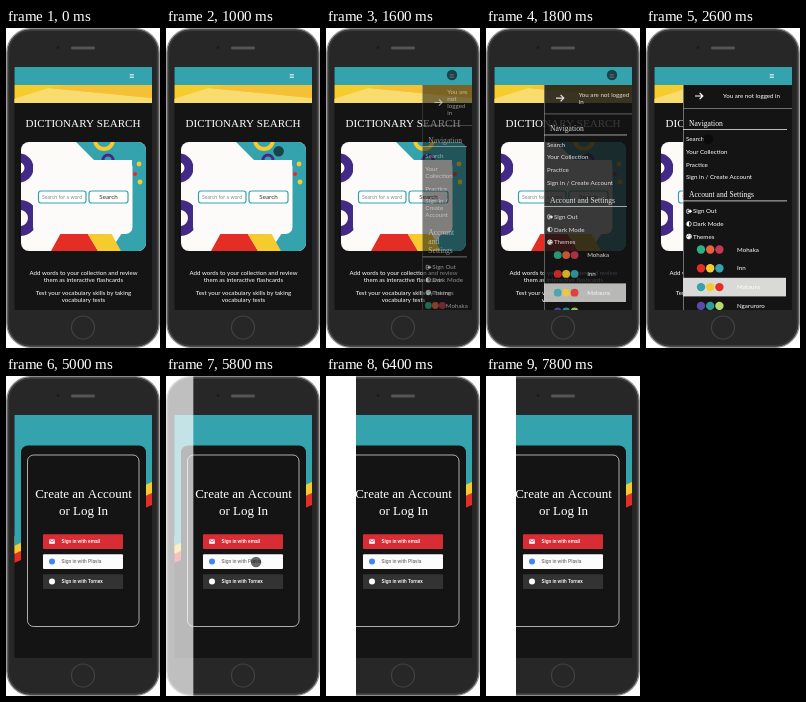
These frames come from a looping animation (154 px wide and 320 px high, 8000 ms). An HTML page with a canvas:

```html
<!DOCTYPE html>
<html lang="en">
<head>
<meta charset="utf-8">
<title>Dictionary app</title>
<style>
html, body { margin: 0; width: 100%; height: 100%; overflow: hidden; background: #fff; }
canvas { display: block; width: 154px; height: 320px; }
</style>
</head>
<body>
<canvas id="stage"></canvas>
<script>
const W = 154, H = 320, LOOP = 8000, STEP = 200;
const TEAL = '#35a3ae', YELLOW = '#f6cb2d', RED = '#e32d25', PURPLE = '#432a86',
      INK = '#141414', WHITE = '#fff';
const SANS = 'Lato, "Open Sans", sans-serif';
const SERIF = '"Liberation Serif", serif';
const SCREEN = { x: 8.5, y: 39, w: 137.5, h: 243 };
const RIGHT = SCREEN.x + SCREEN.w;

const canvas = document.getElementById('stage');
const c = canvas.getContext('2d');
const dpr = window.devicePixelRatio || 1;
canvas.width = W * dpr;
canvas.height = H * dpr;

const clamp = v => Math.max(0, Math.min(1, v));
const mix = (a, b, k) => a + (b - a) * k;
const ease = k => k * k * (3 - 2 * k);

function rect(x, y, w, h, fill) {
  c.fillStyle = fill;
  c.fillRect(x, y, w, h);
}

function round(x, y, w, h, r, fill, stroke, line = 1) {
  c.beginPath();
  c.roundRect(x, y, w, h, r);
  if (fill) { c.fillStyle = fill; c.fill(); }
  if (stroke) { c.strokeStyle = stroke; c.lineWidth = line; c.stroke(); }
}

function dot(x, y, r, fill) {
  c.beginPath();
  c.arc(x, y, r, 0, 7);
  c.fillStyle = fill;
  c.fill();
}

function ring(x, y, r, stroke, line) {
  c.beginPath();
  c.arc(x, y, r, 0, 7);
  c.strokeStyle = stroke;
  c.lineWidth = line;
  c.stroke();
}

function poly(fill, ...p) {
  c.beginPath();
  for (let i = 0; i < p.length; i += 2) c.lineTo(p[i], p[i + 1]);
  c.closePath();
  c.fillStyle = fill;
  c.fill();
}

function text(s, x, y, size, family, fill = WHITE, align = 'left', weight = 400) {
  c.font = `${weight} ${size}px ${family}`;
  c.textAlign = align;
  c.textBaseline = 'alphabetic';
  c.fillStyle = fill;
  c.fillText(s, x, y + size * 0.34);
}

function clipped(path, draw) {
  c.save();
  c.beginPath();
  path();
  c.clip();
  draw();
  c.restore();
}

// Draws word-wrapped lines and returns the y of the last one.
function wrapped(s, x, y, width, size, family, gap) {
  c.font = `400 ${size}px ${family}`;
  const lines = [];
  for (const word of s.split(' ')) {
    const last = lines[lines.length - 1];
    if (last && c.measureText(last + ' ' + word).width <= width) lines[lines.length - 1] += ' ' + word;
    else lines.push(word);
  }
  lines.forEach((l, i) => text(l, x, y + i * gap, size, family));
  return y + (lines.length - 1) * gap;
}

function phone() {
  round(0.9, 0.7, 152.2, 318.6, 24, '#272727', '#8c8c8d', 1.4);
  round(2.6, 2.2, 148.8, 315.6, 22, null, '#3a3a3b', 1.4);
  dot(52, 19.5, 1.3, '#1a1a1c');
  round(65, 18.6, 24, 2.8, 1.4, '#555');
  ring(77, 299.5, 11.5, '#434344', 1.2);
}

function banner() {
  rect(8, 57, 138, 18, YELLOW);
  poly('#f8dc70', 8, 75, 8, 71, 42, 60, 146, 70, 146, 75);
  poly('#f4c136', 42, 60, 60, 57, 146, 57, 146, 70);
}

function art() {
  clipped(() => c.roundRect(15, 114, 125, 109, 8), () => {
    rect(15, 114, 125, 109, '#fdfbf8');
    poly(TEAL, 70, 114, 140, 114, 140, 223, 104, 223, 126, 190, 126, 132, 88, 132);
    ring(98, 112, 9, YELLOW, 4);
    ring(13, 140, 10, PURPLE, 9);
    ring(14, 190, 13, PURPLE, 10);
    poly(RED, 45, 223, 56, 203, 80, 203, 92, 223);
    poly(YELLOW, 80, 203, 104, 203, 115, 223, 92, 223);
    ring(102, 132, 5, PURPLE, 3);
    dot(133, 136, 2.4, YELLOW);
    dot(129, 146, 2, RED);
    dot(134, 154, 2.4, YELLOW);
  });
  round(27, 132, 99.5, 74, 7, '#fdfbfa');
}

function searchPage() {
  rect(8, 39, 138, 243, INK);
  banner();
  text('DICTIONARY SEARCH', 77, 95, 11.1, SERIF, WHITE, 'center');
  art();
  round(32.5, 163, 47.5, 12, 2.5, WHITE, TEAL, 1.2);
  text('Search for a word', 36, 169, 5.2, SANS, '#85898c');
  round(83, 163, 39, 12, 2.5, WHITE, TEAL, 1.2);
  text('Search', 102.5, 169, 6.3, SANS, '#333', 'center');
  [['Add words to your collection and review', 244.5],
   ['them as interactive flashcards', 251.8],
   ['Test your vocabulary skills by taking', 264.5],
   ['vocabulary tests', 271.5]]
    .forEach(([s, y]) => text(s, 77.5, y, 6.1, SANS, WHITE, 'center'));
}

function header() {
  rect(8, 39, 138, 18, TEAL);
  for (let i = 0; i < 3; i++) rect(123.7, 46 + i * 1.6, 4.2, 0.8, '#e4f2f3');
}

function button(y, fill, ink, label, icon) {
  round(37, y, 80, 14.6, 1, fill);
  icon(46, y + 7.3);
  text(label, 55.5, y + 7.4, 4.9, 'Roboto, sans-serif', ink, 'left', 500);
}

function envelope(x, y) {
  rect(x - 2.8, y - 2.2, 5.6, 4.4, WHITE);
  c.beginPath();
  c.moveTo(x - 2.6, y - 1.7);
  c.lineTo(x, y + 0.2);
  c.lineTo(x + 2.6, y - 1.7);
  c.strokeStyle = '#d92d35';
  c.lineWidth = 0.7;
  c.stroke();
}

function loginPage() {
  rect(8, 39, 138, 243, INK);
  poly(RED, 8, 170, 146, 105, 146, 129, 8, 187);
  poly(YELLOW, 8, 160, 146, 100, 146, 117, 8, 178);
  poly(TEAL, 8, 39, 146, 39, 146, 106, 8, 170);
  round(15, 69.5, 125, 195, 7, INK);
  round(21.5, 79, 111.5, 171.5, 6, null, '#d5d5d5', 0.8);
  text('Create an Account', 77.5, 118, 13, SERIF, WHITE, 'center');
  text('or Log In', 77.5, 134.5, 13, SERIF, WHITE, 'center');
  button(158.3, '#d92d35', WHITE, 'Sign in with email', envelope);
  button(178.3, '#fcfcfc', '#757575', 'Sign in with Plavia', (x, y) => dot(x, y, 3, '#4285f4'));
  button(198.3, '#333', WHITE, 'Sign in with Tornex', (x, y) => dot(x, y, 3, WHITE));
}

const settingIcons = [
  (x, y) => {
    round(x - 2.2, y - 2, 2.4, 4, 0.6, null, WHITE, 0.8);
    rect(x - 1, y - 0.6, 2.4, 1.2, WHITE);
    poly(WHITE, x + 0.9, y - 2, x + 3.2, y, x + 0.9, y + 2);
  },
  (x, y) => {
    ring(x, y, 2.3, WHITE, 0.7);
    c.beginPath();
    c.arc(x, y, 2.3, Math.PI / 2, Math.PI * 1.5);
    c.fillStyle = WHITE;
    c.fill();
  },
  (x, y) => {
    dot(x, y, 2.7, WHITE);
    [[-1.3, 0], [-0.3, -1.4], [1.2, -0.7], [1.2, 1.4]].forEach(([a, b]) => dot(x + a, y + b, 0.5, INK));
  }
];

const themes = [
  ['Mohaka', '#2cb184', '#e5653d', '#c4394f'],
  ['Inn', RED, YELLOW, TEAL],
  ['Mataura', TEAL, YELLOW, RED],
  ['Ngaruroro', '#5b4aa8', '#2f9c9a', '#b9d86a']
];

function arrow(x, y) {
  c.beginPath();
  c.moveTo(x - 4, y);
  c.lineTo(x + 3.6, y);
  c.moveTo(x + 0.6, y - 3.2);
  c.lineTo(x + 3.8, y);
  c.lineTo(x + 0.6, y + 3.2);
  c.strokeStyle = WHITE;
  c.lineWidth = 1.2;
  c.stroke();
}

function menuBody(x, w) {
  const k = clamp((w - 50) / 59);
  const room = w - 12;
  rect(x, 57, w, 225, INK);
  rect(x, 57, 0.7, 225, '#999');

  const tx = x + mix(25, 40, k);
  const top = mix(64, 68, k);
  let y = wrapped('You are not logged in', tx, top, RIGHT - tx - 1, 6.2, SANS, 7);
  arrow(x + 16, (top + y) / 2);
  y += 12;
  rect(x, y, w, 0.7, '#999');

  const heading = s => {
    y = wrapped(s, x + 6, y, room - 4, 7.6, SERIF, 9);
    rect(x, y + 6, w - 5, 0.8, '#e8e8e8');
  };
  y += 15;
  heading('Navigation');
  y += 3.6;
  for (const s of ['Search', 'Your Collection', 'Practice', 'Sign in / Create Account'])
    y = wrapped(s, x + 3, y + 12.6, room, 6.2, SANS, 7);
  y += 17.5;
  heading('Account and Settings');
  y += 4.2;
  ['Sign Out', 'Dark Mode', 'Themes'].forEach((s, i) => {
    y += 12.6;
    settingIcons[i](x + 6, y);
    text(s, x + 10, y, 6.2, SANS);
  });

  y -= 5.8;
  const dx = x + mix(6, 18, k);
  for (const [name, ...colors] of themes) {
    y += 18.8;
    if (name === 'Mataura') rect(x, y - 9.3, w - 6, 18.6, '#d9d9d7');
    colors.forEach((col, i) => dot(dx + i * mix(7, 9.2, k), y, mix(3.4, 4.2, k), col));
    text(name, x + mix(23.5, 54, k), y, 6.2, SANS);
  }
}

function menu(open) {
  if (open <= 0) return;
  const w = 109 * open;
  c.globalAlpha = 0.15 + 0.85 * open;
  clipped(() => c.rect(RIGHT - w, 57, w, 225), () => menuBody(RIGHT - w, w));
  c.globalAlpha = 1;
}

// Pointer legs: start, end, from, to.
const legs = [
  [800, 1400, 108, 150, 126, 47],
  [1400, 1800, 126, 47, 126, 47],
  [1800, 2600, 126, 47, 62, 111],
  [2600, 3400, 62, 111, 70, 148],
  [3400, 3800, 70, 148, 70, 148],
  [5200, 5800, 78, 150, 90, 186],
  [5800, 6000, 90, 186, 90, 186]
];

function pointer(t) {
  const leg = legs.find(([a, b]) => t >= a && t < b);
  if (!leg) return;
  const [a, b, x0, y0, x1, y1] = leg;
  const k = ease((t - a) / (b - a));
  dot(mix(x0, x1, k), mix(y0, y1, k), 5.2, 'rgba(5,5,5,.6)');
}

function draw(t) {
  c.setTransform(dpr, 0, 0, dpr, 0, 0);
  rect(0, 0, W, H, WHITE);
  phone();
  const onLogin = t >= 4200;
  clipped(() => c.rect(SCREEN.x, SCREEN.y, SCREEN.w, SCREEN.h), () => {
    if (onLogin) loginPage();
    else {
      searchPage();
      header();
    }
    const k = onLogin ? 1 - clamp((t - 4000) / 600) : clamp((t - 1400) / 600);
    menu(1 - (1 - k) ** 1.5);
    pointer(t);
  });
  const fade = clamp((t - 5400) / 600);
  if (fade) rect(0, 0, mix(22, 30, fade), H, `rgba(255,255,255,${Math.min(1, fade * 1.05)})`);
}

function tick() {
  const t = performance.now() % LOOP;
  draw(Math.floor(t / STEP) * STEP);
  requestAnimationFrame(tick);
}
tick();
</script>
</body>
</html>
```
